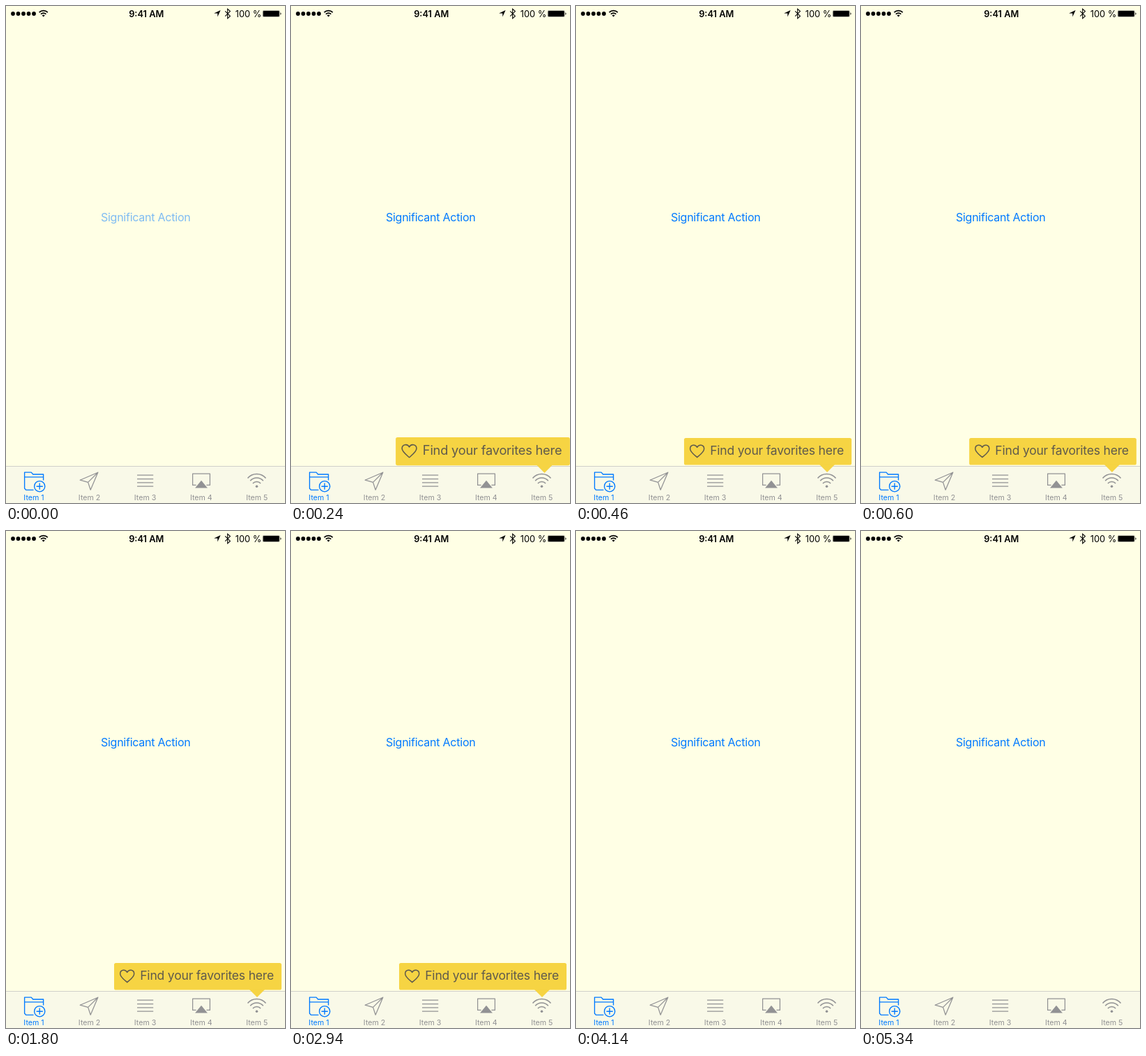
Write an HTML page that moves like this. It is 400 by 711 pixels and loops after 5.6 s.

```html
<!DOCTYPE html>
<html lang="en">
<head>
<meta charset="utf-8">
<title>Tab bar tooltip</title>
<style>
  html, body { margin: 0; width: 100%; height: 100%; overflow: hidden; background: #ffffe5; }
  svg { display: block; width: 100vw; height: 100vh; }
  text { font-family: Inter, Roboto, sans-serif; font-weight: 430; }
  .status { font-size: 12.8px; }
  .status .time { font-weight: 600; text-anchor: middle; }
  .tab { fill: none; stroke: #929294; stroke-width: 1.25; stroke-linejoin: round; }
  .tab text { font-size: 10.67px; text-anchor: middle; fill: #929294; stroke: none; }
  .tab .solid { fill: #929294; stroke: none; }
  .tab.on { stroke: #007aff; stroke-width: 1.35; }
  .tab.on text { fill: #007aff; }
  #action { font-size: 16px; letter-spacing: -.24px; text-anchor: middle; fill: #007aff; }
  #tip { transform-origin: 275px 642px; }
  #tip text { font-size: 17.5px; letter-spacing: -.18px; font-weight: 400; fill: #5f5a4c; }
</style>
</head>
<body>
<svg viewBox="0 0 400 711">
  <rect width="400" height="711" fill="#ffffe5"/>

  <g class="status">
    <path d="M10 11h30.1" stroke="#000" stroke-width="5.8" stroke-linecap="round" stroke-dasharray="0 7.5"/>
    <path d="M47.6 9.1a8.7 8.7 0 0 1 12.2 0M50 11.6a5.3 5.3 0 0 1 7.4 0" fill="none" stroke="#000" stroke-width="1.7"/>
    <path d="M53.7 15.6l-2-2.1a2.9 2.9 0 0 1 4 0z"/>
    <text class="time" x="201.2" y="15.6">9:41 AM</text>
    <path d="M307.6 6l-4.3 9.6v-5.2h-5.2z"/>
    <path d="M314.2 7.4l7.2 7-3.7 3.4V4.2l3.7 3.4-7.2 7" fill="none" stroke="#000" stroke-width="1.1"/>
    <text x="328.8" y="15.6">100 %</text>
    <rect x="367.7" y="6" width="25" height="10" rx="2" fill="#b8b8a8"/>
    <rect x="368.7" y="7" width="23" height="8" rx="1"/>
    <path d="M393.4 9.2a2 2 0 0 1 0 3.6z"/>
  </g>

  <text id="action" x="200.2" y="308">Significant Action</text>

  <rect y="658" width="400" height="53" fill="#f9f9e8"/>
  <rect y="658" width="400" height="1" fill="#d0cfc9"/>

  <g class="tab on">
    <path d="M39.5 692.4H28.6L26.6 690V667.1H36.2L38.8 670H53.6V678.6M26.6 673.8H53.6"/>
    <circle cx="48.2" cy="687.2" r="7.6"/>
    <path d="M48.2 682.6v9.2M43.6 687.2h9.2"/>
    <text x="40" y="707.4">Item 1</text>
  </g>
  <g class="tab">
    <path d="M131.8 667.2L106.2 678.2 117.6 681.4 121.2 692.2zL117.6 681.4"/>
    <text x="119.6" y="707.4">Item 2</text>
  </g>
  <g class="tab">
    <path d="M188 671.2h23.2M188 676.5h23.2M188 681.9h23.2M188 687.2h23.2"/>
    <text x="199.6" y="707.4">Item 3</text>
  </g>
  <g class="tab">
    <path d="M272.6 685.4h-5V669.1h24.8v16.3h-5"/>
    <path class="solid" d="M280 678.8l8.9 10.6h-17.8z"/>
    <text x="279.8" y="707.4">Item 4</text>
  </g>
  <g class="tab">
    <path d="M346.5 675.5a17.2 17.2 0 0 1 26 0M350.2 679.3a12.3 12.3 0 0 1 18.6 0M353.9 683a7.5 7.5 0 0 1 11.2 0" stroke-width="1.6"/>
    <circle class="solid" cx="359.5" cy="687.3" r="1.8"/>
    <text x="359.8" y="707.4">Item 5</text>
  </g>

  <g id="tip">
    <path d="M349 656h22l-11 11z" fill="#f6d443"/>
    <rect x="155" y="618" width="240" height="38.6" rx="2.6" fill="#f6d443"/>
    <path d="M173.7 645.6C169 641.6 163.7 637.8 163.7 633.4C163.7 627.4 171.4 626.4 173.7 631.4C176 626.4 183.7 627.4 183.7 633.4C183.7 637.8 178.4 641.6 173.7 645.6z" fill="none" stroke="#5f5a4c" stroke-width="1.5" stroke-linejoin="round"/>
    <text x="192.2" y="642">Find your favorites here</text>
  </g>
</svg>
<script>
  const LOOP = 5600, HIDE = 3840, SETTLE = 600, FADE = 260;
  const action = document.getElementById('action');
  const tip = document.getElementById('tip');

  // Underdamped step response that settles to 0.1% after SETTLE ms
  function spring(ms) {
    const zeta = 0.7, decay = Math.log(1000) / SETTLE;
    const k = zeta / Math.sqrt(1 - zeta * zeta);
    const a = decay / k * ms;
    return 1 - Math.exp(-decay * ms) * (Math.cos(a) + k * Math.sin(a));
  }

  function draw(t) {
    const left = 1 - Math.min(t / FADE, 1);
    action.style.opacity = 1 - 0.5 * left * left;
    const s = t < HIDE ? spring(t) : 0;
    tip.style.transform = `scale(${s})`;
    tip.style.opacity = Math.min(s, 1);
  }

  const start = performance.now();
  function tick() {
    draw((performance.now() - start) % LOOP);
    requestAnimationFrame(tick);
  }
  draw(0);
  requestAnimationFrame(tick);
</script>
</body>
</html>
```
